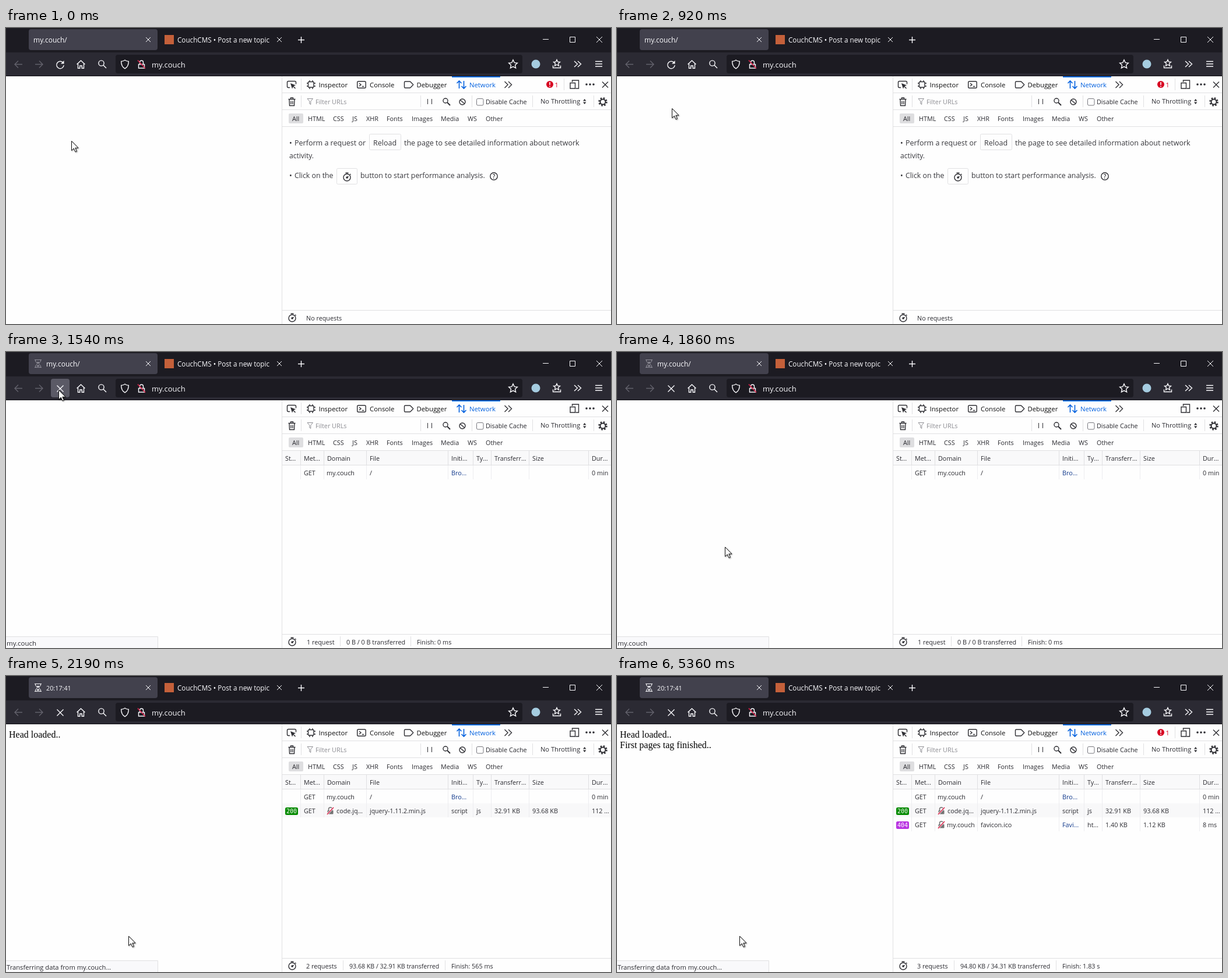
These frames come from a looping animation (1038 px wide and 509 px high, 8 s). An HTML page:

```html
<!DOCTYPE html>
<html lang="en">
<head>
<meta charset="utf-8">
<title>Network panel</title>
<style>
html, body { margin: 0; width: 100%; height: 100%; overflow: hidden; background: #fefefe; }
svg { display: block; }
text { font: 10.8px "Open Sans", "Noto Sans", sans-serif; fill: #2a2a30; white-space: pre; }
.tab text { font-size: 11.3px; fill: #0c0c0d; }
.note text { font-size: 12.5px; fill: #38383d; }
.page text { font: 16px "Liberation Serif", serif; fill: #000; }
.code { font: 10px "DejaVu Sans Mono", monospace; fill: #fff; }
.line { fill: none; stroke-width: 1.4; }
.thin { fill: none; stroke-width: 1; }
.light { stroke: #fbfbfe; }
.dark { stroke: #2e2e33; }
.rule { stroke: #e0e0e2; fill: none; }
.cell { stroke: #ededf0; fill: none; }
.chrome text { fill: #fbfbfe; }
#cursor { filter: drop-shadow(1.5px 1.5px 1px rgba(0,0,0,.4)); }
</style>
</head>
<body>
<svg width="1038" height="509" viewBox="0 0 1038 509">
<defs>
  <g id="cross" class="thin"><path d="M-4-4l8 8M4-4l-8 8"/></g>
  <g id="watch" class="line dark" stroke-width="1.6">
    <circle r="6"/><path d="M0 1l2.5-3M-2.5-7.8h5M5-6l1.5 1.5"/><circle r="1" fill="#2e2e33"/>
  </g>
  <g id="insecure">
    <path d="M-3-1v-2a3 3 0 0 1 6 0v2" fill="none" stroke="#737373" stroke-width="1.6"/>
    <rect x="-5" y="-1" width="10" height="6.5" rx="1" fill="#737373"/>
    <path d="M-5.5 6l11-12" stroke="#fff" stroke-width="3"/>
    <path d="M-5.5 6l11-12" stroke="#d7264c" stroke-width="1.6"/>
  </g>
  <g id="glass">
    <path class="thin" stroke="currentColor" stroke-width="1.3" d="M-6-6.5h12M-6 6.5h12M-4.5-6v2l3.5 4-3.5 4v2M4.5-6v2l-3.5 4 3.5 4v2"/>
    <path fill="currentColor" d="M-2.5-3h5l-2.5 3zM-3 5l3-3 3 3z"/>
  </g>
</defs>

<!-- browser chrome -->
<g class="chrome">
  <rect width="1038" height="42" fill="#1c1b22"/>
  <rect y="42" width="1038" height="41" fill="#2b2a33"/>
  <rect y="82" width="1038" height="1" fill="#0f0e14"/>
  <rect x="39" y="2" width="221" height="36" rx="4" fill="#42414d"/>
  <rect x="188" y="46" width="698" height="32" rx="4" fill="#1c1b22"/>
  <text x="47" y="25" style="font-size:12px" data-t="0 1440">my.couch/</text>
  <g data-t="1440 2100">
    <use href="#glass" x="55" y="20" color="#92919b"/>
    <text x="69" y="25" style="font-size:12px">my.couch/</text>
  </g>
  <g data-t="2100 8000">
    <use href="#glass" x="55" y="20" color="#fbfbfe"/>
    <text x="69" y="25">20:17:41</text>
  </g>
  <rect x="272" y="12" width="16" height="16" fill="#c4603a"/>
  <text x="294" y="25" style="font-size:11.7px">CouchCMS • Post a new topic</text>
  <text x="250" y="68" style="font-size:13px">my.couch</text>

  <g class="light">
    <use href="#cross" x="244" y="20"/><use href="#cross" x="469" y="20"/>
    <path class="line" d="M501 20.5h11M506.5 15v11"/>
    <path class="thin" d="M921 19.5h10M967.5 15.5h9v9h-9zM1013 15l10 10M1023 15l-10 10"/>
  </g>
  <path class="line" stroke="#62616b" d="M28 62.5H15M21 56.5l-6 6 6 6M50 62.5h13M57 56.5l6 6-6 6"/>
  <rect x="77" y="46" width="32" height="32" rx="4" fill="#5b5a66" data-t="1000 1700"/>
  <g class="line light">
    <g data-t="0 1440">
      <path d="M98 59.8A6.2 6.2 0 1 0 99.2 64"/>
      <path d="M99.5 56v5.5h-5.5z" fill="#fbfbfe" stroke="none"/>
    </g>
    <path data-t="1440 8000" d="M87.5 57.5l11 11M98.5 57.5l-11 11"/>
    <path d="M121.5 62.5l7-6.5 7 6.5M123.5 61.5v7.7h3.2v-4.2h3.6v4.2h3.2v-7.7"/>
    <circle cx="163.5" cy="60.5" r="4.6"/><path d="M167 64l5 5"/>
    <path d="M204 55.2c2 1.4 4 2 6.3 2.2 0 5.5-1.3 9.6-6.3 12.4-5-2.8-6.3-6.9-6.3-12.4 2.3-.2 4.3-.8 6.3-2.2z"/>
    <path d="M229.5 62v-3a3 3 0 0 1 6 0v3M227.5 62.5h10v6.5h-10z"/>
    <path d="M870 54.8l2.2 4.8 5.2.6-3.9 3.5 1.1 5.2-4.6-2.6-4.6 2.6 1.1-5.2-3.9-3.5 5.2-.6z"/>
    <path d="M945 54.5l1.6 3.6 3.9.4-2.9 2.6.8 3.9-3.4-2-3.4 2 .8-3.9-2.9-2.6 3.9-.4zM938.5 64.5v4h13v-4"/>
    <path d="M975 57l5.5 5-5.5 5M981 57l5.5 5-5.5 5M1011 57.5h12M1011 61.7h12M1011 66h12"/>
  </g>
  <path d="M226 55.5l13 14" stroke="#e22850" stroke-width="1.6"/>
  <circle cx="909" cy="62" r="7.5" fill="#a5cce0"/>
</g>

<!-- page -->
<g class="page">
  <text x="5" y="106" data-t="2100 8000">Head loaded..</text>
  <text x="5" y="124" data-t="5360 8000">First pages tag finished..</text>
</g>
<g data-t="1440 8000">
  <path class="rule" fill="#f9f9fb" style="fill:#f9f9fb" d="M-1 489.5H260.5V510H-1z"/>
  <text x="1" y="505" style="font-size:11.5px" data-t="1440 2100">my.couch</text>
  <text x="1" y="505" style="font-size:11.2px" data-t="2100 8000">Transferring data from my.couch...</text>
</g>

<!-- panel frame -->
<path class="rule" d="M473.5 83v426M474 111.5h564M474 140.5h564M474 169.5h564M474 485.5h564M506.5 87v20M506.5 116v20M711.5 116v20M799.5 116v20M903.5 116v20M1008.5 116v20"/>
<rect x="765" y="83" width="83" height="2" fill="#0a70e8"/>
<g class="tab">
  <text x="536.5" y="102">Inspector</text>
  <text x="624" y="102">Console</text>
  <text x="704.5" y="102">Debugger</text>
  <text x="795" y="102" style="fill:#0060df">Network</text>
</g>
<g class="line dark">
  <path d="M487 102.5h-2.500a2 2 0 0 1-2-2v-7a2 2 0 0 1 2-2h11a2 2 0 0 1 2 2v3"/>
  <path d="M488 95l9 3.500-3.500 1.500 3.500 3.500-1 1-3.500-3.500-1.500 3.500z" fill="#2e2e33" stroke="none"/>
  <rect x="518.500" y="92.500" width="9.500" height="9.500" rx="1"/>
  <path d="M521 90v2M521 102v3M516 95h2M528 95h3M526 90v2M526 102v3M516 100h2M528 100h3"/>
  <rect x="602.700" y="91.700" width="14.500" height="11.500" rx="2"/>
  <path d="M606 95l3 2.500-3 2.500M611 100.500h3"/>
  <path d="M685 92h7.500q1 0 1.700.7l4.500 4.800-4.500 4.800q-.7.7-1.700.7h-7.500q-1.500 0-1.500-1.500v-8q0-1.500 1.500-1.500z"/>
  <path d="M855.500 92l5.500 5.500-5.500 5.500M862 92l5.500 5.500-5.500 5.500"/>
  <path d="M971.500 93v-3h11v14h-5M968 94.500h8.500v9.500h-8.500z"/>
  <path d="M1023 92.500l10 10M1033 92.500l-10 10"/>
</g>
<path class="line" stroke="#0060df" style="stroke-width:1.6" d="M777.500 104v-13M773.500 95l4-4 4 4M785.500 91v13M781.500 100l4 4 4-4"/>
<g fill="#2e2e33"><circle cx="996" cy="97" r="1.800"/><circle cx="1002" cy="97" r="1.800"/><circle cx="1008" cy="97" r="1.800"/></g>
<g data-t="0 1440 3350 8000">
  <circle cx="933" cy="97" r="6" fill="#d70022"/>
  <path d="M933 93v5M933 99.500v1.700" stroke="#fff" stroke-width="1.600"/>
  <text x="941.500" y="102" style="fill:#d70022">1</text>
  <path class="rule" d="M957.500 87v20"/>
</g>

<!-- filter bars -->
<g class="line dark">
  <path d="M484.500 122.500h12M488.500 122v-2h4v2M486 123l.5 10.500h8l.5-10.500M489 125.500v5.500M492 125.500v5.500"/>
  <path d="M723.500 122v9M730.500 122v9" style="stroke-width:1"/>
  <circle cx="754" cy="125" r="4"/><path d="M757 128l5 5" style="stroke-width:2"/>
  <circle cx="783" cy="127" r="5"/><path d="M779.500 124l7 6"/>
  <circle cx="1024" cy="127" r="4.500" style="stroke-width:2"/>
  <circle cx="1024" cy="127" r="6.500" style="stroke-width:2.500" stroke-dasharray="2.500 2.605"/>
</g>
<path class="thin" stroke="#909096" d="M517 121.500h9.500l-3.700 4.500v5.500l-2-1.500v-4z"/>
<rect class="thin" stroke="#77777d" x="807.500" y="121.500" width="11.500" height="11.500" rx="2"/>
<path d="M990 125.500l2.700-3.500 2.700 3.500zM990 127.500l2.700 3.500 2.700-3.500z" fill="#2e2e33"/>
<text x="531" y="131" style="fill:#8c8c92">Filter URLs</text>
<text x="823" y="131">Disable Cache</text>
<text x="917" y="130" style="font-size:11.1px">No Throttling</text>
<rect x="485" y="147" width="25" height="17" rx="2" fill="#dedee0"/>
<g id="filters"></g>

<!-- empty state -->
<g class="note" data-t="0 1440">
  <rect class="rule" x="623.500" y="182.500" width="54" height="27" rx="2"/>
  <rect class="rule" x="567.500" y="241.500" width="35" height="27" rx="2"/>
  <text x="486" y="202">•</text>
  <text x="495" y="202">Perform a request or</text>
  <text x="630" y="202">Reload</text>
  <text x="683" y="202">the page to see detailed information about network</text>
  <text x="486" y="224" style="font-size:12.100px">activity.</text>
  <text x="486" y="258">•</text>
  <text x="495" y="258" style="font-size:12.300px">Click on the</text>
  <text x="608" y="258" style="font-size:12.350px">button to start performance analysis.</text>
  <use href="#watch" x="585" y="257"/>
  <circle class="line dark" cx="837" cy="255" r="6.200"/>
  <text x="837" y="259" text-anchor="middle" style="font-size:10px;font-weight:600">?</text>
</g>

<!-- request table -->
<g data-t="1440 8000">
  <path fill="#f9f9fa" d="M474 170h564v24H474z"/>
  <path class="rule" d="M474 194.500h564"/>
  <g id="head"></g>
  <g id="row0"></g>
</g>
<g data-t="2100 8000">
  <path fill="#f8f8f9" d="M474 219h564v24H474z"/>
  <rect x="479" y="226" width="22" height="13" rx="2.500" fill="#058b00"/>
  <text class="code" x="481" y="236">200</text>
  <use href="#insecure" x="556.500" y="232"/>
  <g id="row1"></g>
</g>
<g data-t="3350 8000">
  <rect x="479" y="250" width="22" height="13" rx="2.500" fill="#b833e1"/>
  <text class="code" x="481" y="260">404</text>
  <use href="#insecure" x="556.500" y="256"/>
  <g id="row2"></g>
</g>

<!-- summary -->
<use href="#watch" x="491" y="499"/>
<text x="515" y="503" data-t="0 1440">No requests</text>
<g data-t="1440 2100">
  <path class="rule" d="M573.500 489v17M694.500 489v17"/>
  <text x="516" y="503">1 request</text>
  <text x="584" y="503">0 B / 0 B transferred</text>
  <text x="705" y="503">Finish: 0 ms</text>
</g>
<g data-t="2100 8000">
  <path class="rule" d="M578.500 489v17M753.500 489v17"/>
  <g data-t="2100 3350">
    <text x="515" y="503">2 requests</text>
    <text x="589" y="503" style="font-size:10.600px">93.68 KB / 32.91 KB transferred</text>
    <text x="764" y="503">Finish: 565 ms</text>
  </g>
  <g data-t="3350 8000">
    <text x="515" y="503">3 requests</text>
    <text x="589" y="503" style="font-size:10.600px">94.80 KB / 34.31 KB transferred</text>
    <text x="764" y="503">Finish: 1.83 s</text>
  </g>
</g>

<path id="cursor" fill="#fff" stroke="#111" d="M.5.5v16.200l3.800-3.600 2.700 6 2.400-1-2.600-5.900h5.200z"/>
</svg>
<script>
const LOOP = 8000;
const $ = id => document.getElementById(id);
const columns = [479, 511, 551, 624, 764, 807, 838, 903, 1005];
const borders = [505, 545, 618, 758, 801, 832, 897, 999];
const label = (x, y, s, style = '') => `<text x="${x}" y="${y}" style="${style}">${s}</text>`;

function addRow(id, y, height, kind, cells, domainX) {
  const lines = borders.map(x => `M${x + .5} ${y}v${height}`).join('');
  $(id).innerHTML = `<path class="${kind}" d="${lines}"/>` + cells.map((s, i) => {
    const x = i === 2 ? domainX : columns[i];
    const size = i === 3 && s.length > 15 ? 'font-size:10.5px;' : '';
    return label(x, y + 17, s, size + (/^(Bro|Favi)/.test(s) ? 'fill:#123a8c' : ''));
  }).join('');
}

addRow('head', 170, 24, 'rule', ['St…', 'Met…', 'Domain', 'File', 'Initi…', 'Ty…', 'Transferr…', 'Size', 'Dur…'], 551);
addRow('row0', 195, 24, 'cell', ['', 'GET', 'my.couch', '/', 'Bro…', '', '', '', '0 min'], 550);
addRow('row1', 219, 24, 'cell', ['', 'GET', 'code.jq…', 'jquery-1.11.2.min.js', 'script', 'js', '32.91 KB', '93.68 KB', '112 …'], 567);
addRow('row2', 243, 24, 'cell', ['', 'GET', 'my.couch', 'favicon.ico', 'Favi…', 'ht…', '1.40 KB', '1.12 KB', '8 ms'], 566);

const filters = { All: 491, HTML: 518, CSS: 561, JS: 594, XHR: 618, Fonts: 653, Images: 696, Media: 746, WS: 792, Other: 823 };
$('filters').innerHTML = Object.entries(filters).map(([s, x]) => label(x, 160, s)).join('');

// time, x, y
const path = [
  [0, 112, 194], [290, 112, 194], [530, 129, 242], [790, 129, 242],
  [920, 94, 139], [1040, 91, 70], [1120, 90, 65], [1650, 90, 65],
  [1860, 185, 334], [2080, 210, 447], [LOOP, 210, 447]
];
const timed = [...document.querySelectorAll('[data-t]')].map(el => [el, el.dataset.t.split(' ').map(Number)]);

function draw(t) {
  for (const [el, times] of timed) {
    const shown = times.filter(s => s <= t).length % 2;
    el.style.display = shown ? '' : 'none';
  }
  const i = path.findIndex(p => p[0] > t);
  const [t0, x0, y0] = path[i - 1], [t1, x1, y1] = path[i];
  const k = (t - t0) / (t1 - t0);
  const x = Math.round(x0 + (x1 - x0) * k), y = Math.round(y0 + (y1 - y0) * k);
  $('cursor').setAttribute('transform', `translate(${x} ${y})`);
}

const start = performance.now();
function tick() {
  draw((performance.now() - start) % LOOP);
  requestAnimationFrame(tick);
}
tick();
</script>
</body>
</html>
```
